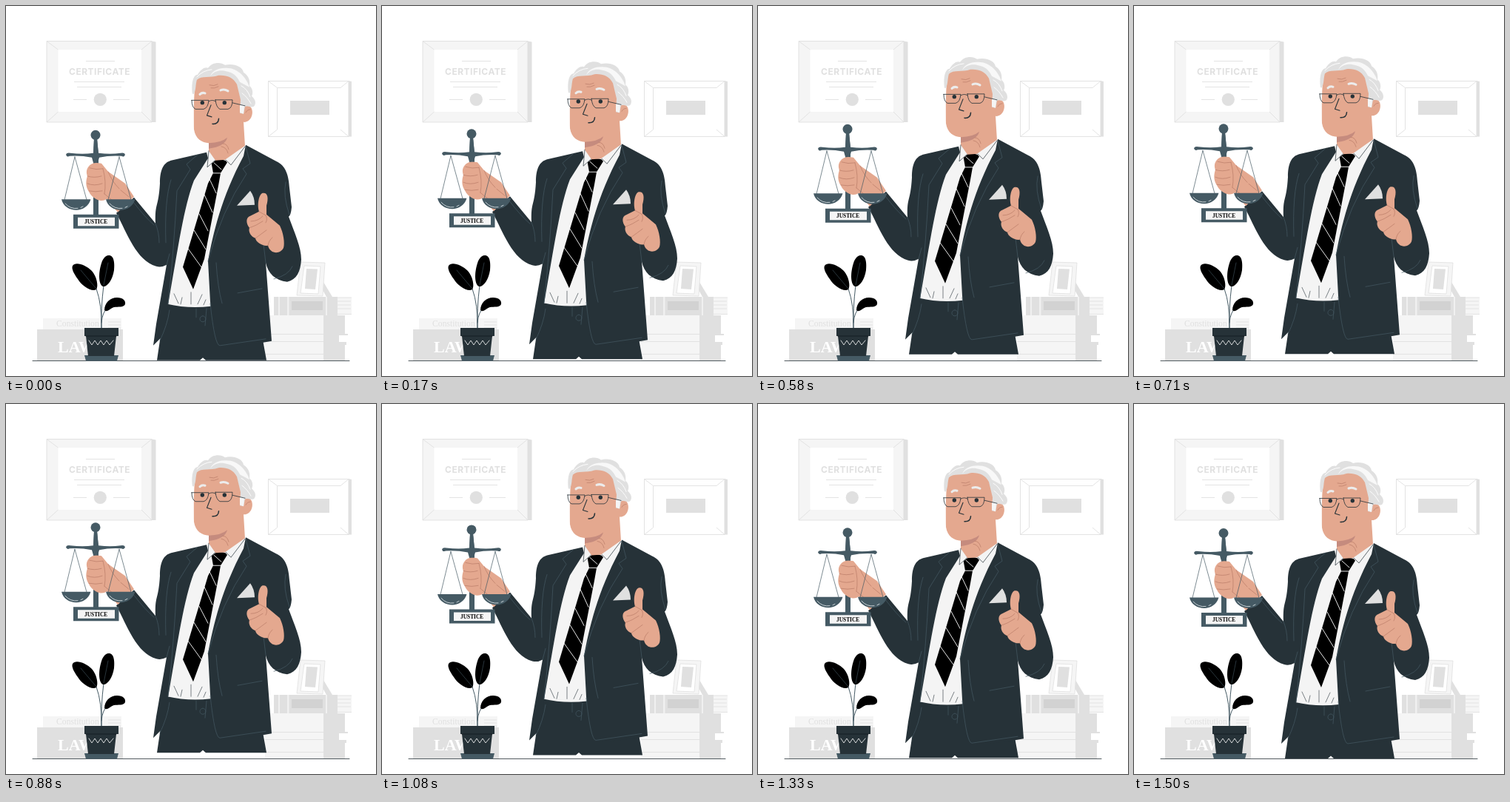
Animation of 500 by 500 pixels, one loop 1540 ms. Source, as an HTML page:

```html
<!DOCTYPE html>
<html lang="en">
<head>
<meta charset="utf-8">
<title>Justice</title>
<style>
html, body { margin: 0; width: 100%; height: 100%; overflow: hidden; background: #fff; }
svg { display: block; width: 100%; height: 100%; }
.line { fill: none; stroke-linecap: round; stroke-linejoin: round; }
.pale { fill: #f5f5f5; }
.grey { fill: #e0e0e0; }
.edge { fill: none; stroke: #e0e0e0; stroke-width: .9; }
.suit { fill: #263238; }
.seam { stroke: #455a64; stroke-width: .7; }
.skin { fill: #e4a88f; }
.crease { stroke: #b97c67; stroke-width: .7; }
.steel { fill: #455a64; }
.ink { stroke: #263238; }
.serif { font-family: "Liberation Serif", "Times New Roman", serif; }
</style>
</head>
<body>
<svg viewBox="0 0 500 500">
  <!-- certificate -->
  <path class="grey" d="M197 47.5 202.5 48.5V157H197Z"/>
  <rect class="pale" x="55" y="47.5" width="142" height="109.5"/>
  <path fill="#fff" d="M70.500 59H183V143H70.500Z"/>
  <path class="edge" d="M55 47.500H197V157H55ZM55 47.500 70.500 59M197 47.500 183 59M55 157 70.500 143M197 157 183 143"/>
  <text x="85" y="93" class="grey" font-family="Inter, sans-serif" font-weight="700" font-size="12" letter-spacing=".5">CERTIFICATE</text>
  <path class="edge" d="M108 74.500H147M92 102.500H160M96 109.500H156M91 126.500H109M145 126.500H167"/>
  <circle class="grey" cx="127.300" cy="126.300" r="8.600"/>

  <!-- small frame -->
  <path class="grey" d="M463 101 467 102V176.500H463Z"/>
  <path fill="#fff" d="M354.500 101.500H463V176.500H354.500Z"/>
  <path class="edge" d="M354.500 101.500H463V176.500H354.500ZM366.500 167V110.500H452M354.500 101.500 366.500 110.500M463 101.500 452 110.500M354.500 176.500 366.500 167M463 176.500 452 167"/>
  <path class="grey" d="M384 128H437V147H384Z"/>

  <!-- books, left -->
  <path class="pale" d="M50 422H156V438H50Z"/>
  <path class="edge" stroke-width=".6" d="M138 427H155M138 431H155M138 435H155"/>
  <text x="68" y="433.300" class="grey serif" font-size="11.700">Constitution</text>
  <path class="grey" d="M42 437H158V479H42Z"/>
  <text x="70" y="468" class="serif" fill="#fff" font-weight="700" font-size="22">LAW</text>

  <!-- books and photo frame, right -->
  <path class="grey" d="M429 373 441 393H433L427 382Z"/>
  <path class="pale" stroke="#e0e0e0" stroke-width=".8" d="M398 346 431 347 428 392 393 391Z"/>
  <path fill="#fff" stroke="#e0e0e0" stroke-width=".8" d="M403 351 425 352 422 389 398 388Z"/>
  <path class="grey" d="M406 355 421 355.500 418 383 404 382Z"/>
  <path class="pale" d="M350 418H429V479H350Z"/>
  <path class="grey" d="M429 418H458V443H462V445H450V454H460V458H458V479H429Z"/>
  <path class="edge" d="M350 443.500H429M350 453.500H429M350 470.500H429"/>
  <path class="grey" d="M362 393H448V418H362Z"/>
  <path class="pale" d="M448 394H467V417H448Z"/>
  <path class="edge" d="M448 394H467M448 399H466M448 404H466M448 409H466M448 416.500H467"/>
  <path fill="#f0f0f0" d="M368 393H370V418H368ZM380 393H382.500V418H380ZM432 393H434V418H432Z"/>
  <path fill="#d2d2d2" d="M386 399H428V411H386Z"/>

  <path class="line ink" stroke-width=".8" d="M36 479.500H464"/>

  <g id="man">
    <!-- shirt and trousers -->
    <path class="suit" d="M217 403 278 405 345 440 352 479H270L266 475.500 262 479H204L208 452Z"/>
    <path fill="#f4f4f4" d="M273 195 321 189 326 200 290 290 274 345 277 406Q246 409.500 218 403L222 330 242 250Z"/>
    <path class="line ink" stroke-width=".6" d="M227 389 233 402M238 394 236 403M250 387V403M265 390 259 403M270 397 267 404"/>
    <path class="line seam" d="M257 409V421M271 409 269 432M266 419a4 4 0 1 1-.1 0M221 411Q218 432 208 452"/>

    <!-- tie -->
    <path d="M277 209Q288 206 300 210L290 226 287 243 268 342 253 383 239 353 273 240 280 226Z"/>
    <path class="line" stroke="#fff" stroke-width=".9" d="M280 226 290 226M275 234 284 253M268 255 279 279M261 281 273 304M254 303 270 329M246 328 264 353M281 212 291 221"/>

    <!-- face and neck -->
    <path class="skin" d="M258 94C253 113 254 145 254 167 256 180 265 185 274 185.500L274 198 283 209 297 208 323 190 321 157C330 158 335 147 332 139 330 134 325 134 322 137L321 105 295 89Z"/>
    <path fill="#c58b7e" d="M274 185.500Q291 185 299 178 296 190 274 193Z"/>
    <path class="line crease" d="M291 190Q298 191 300 199M293 186Q299 186 301 194M324 144Q326 140 330 140M275 107Q281 109 286 106M277 111Q281 112 287 109"/>
    <path fill="#f4f4f4" d="M274 196 272 218 283 209ZM323 189 325 196 303 217 296 208Z"/>
    <path class="line ink" stroke-width=".7" d="M274 196 272 218 282 209M323 190 304 215 297 208"/>

    <!-- hair -->
    <path class="grey" d="M252 119C250 105 253 93 259 93 263 85 270 82 273 84 279 75 291 76 296 80 307 77 320 82 321 90 329 95 330 103 329 108 334 112 334 119 332 122 338 127 338 133 335 136 330 138 326 134 323 136L321 146 316 145 317 127 312 106C307 96 297 93 287 94 276 98 264 94 258 100 256 106 257 113 254 119Z"/>
    <path fill="#f8f8f8" d="M276 95C282 87 291 86 300 89 309 91 313 97 316 103L329 110C325 97 313 83 296 84 286 84 279 88 276 95Z"/>
    <path class="line" stroke="#fff" stroke-width=".9" d="M258 96Q266 87 278 86M318 108Q326 112 330 123M319 118Q326 123 331 132"/>
    <path class="pale" d="M316 134H322L321 146 316 144Z"/>

    <!-- features -->
    <path class="line" stroke="#ececec" stroke-width="3" d="M262 119.500Q265 116.500 269 118M290 114Q295 112 300 115"/>
    <circle class="suit" cx="265.300" cy="130.800" r="2.700"/>
    <circle class="suit" cx="295.300" cy="130.800" r="2.700"/>
    <path class="line ink" stroke-width=".8" d="M251 127.500H274Q273 138 267 139.500H256Q251 137 251 127.500ZM283 127H306Q306 138 300 139.500H289Q284 137 283 127ZM274 129Q279 126 283 129M306 131 323 135"/>
    <path class="line ink" stroke-width="1.100" d="M277 134 271.500 148 278 150"/>
    <path class="line ink" stroke-width="1.500" d="M279 159.500Q287 160 287.500 152.500"/>

    <!-- jacket -->
    <path class="suit" d="M271 198 273 206 254 236C240 273 233 325 219 404L215 430 209 449 199 459 203 430 217 350Q210 354 203 352C176 344 164 308 149 280L173 259 202 294C201 265 206 274 208 240 208 221 213 212 223 209Z"/>
    <path class="suit" d="M324 188 365 210C379 216 382 231 383 246L386 272Q385 283 382 285C390 307 399 326 399 343 398 359 393 370 380 373 364 371 354 362 351 347L359 453Q323 460 288 461 281 458 280 440L276 400 273 345C280 307 291 259 321 203Z"/>
    <path class="line seam" d="M259 201 244 214 249 221 231 250Q227 330 219 403M223 235Q214 262 216 320M202 294Q207 306 207 320M217 350 221 335M324 190 330 213 320 220 325 227Q291 277 273 345M284 347Q286 380 292 402M313 388 346 382M348 322 351 347M276 402Q282 459 289 459L351 450M378 238Q374 257 383 282M362 369Q382 364 387 352M172 265Q188 286 200 296"/>
    <path class="grey" d="M312 270 330 250Q336 258 336 269Z"/>

    <!-- raised thumb -->
    <path class="skin" d="M342 278C339 268 342 254 347 253 354 252 355 260 352 270V282L370 297C375 307 377 321 375 327 371 336 357 336 354 324 347 325 338 320 337 314 331 312 327 305 329 300 324 294 324 286 330 284Z"/>
    <path class="line crease" d="M342 278 351 283M329 300Q338 297 347 291M337 314Q344 309 352 303M354 324Q355 317 360 313M331 291Q341 291 347 284M351 283Q354 288 351 293"/>

    <!-- hand behind scales -->
    <path class="steel" d="M119 179H123L125 202V283H118V202Z"/>
    <path class="skin" d="M111 218Q116 210 129 213L138 224 161 240 173 258 151 279 136 261C128 267 116 260 112 251 107 244 108 236 110 230 108 225 109 221 111 218Z"/>
    <path class="line crease" d="M110 230Q119 233 129 230M110 240Q119 244 130 240M112 250Q121 252 130 250M113 219Q122 222 131 220M131 220Q136 238 133 254M138 224Q143 237 153 247M133 254 144 263M155 249 166 258"/>

    <!-- scales -->
    <circle class="steel" cx="121" cy="174.500" r="6.500"/>
    <path class="steel" d="M81 201Q82 198 87 199 104 201 118 199L119 180H123L125 199Q141 201 155 199 160 198 161 201 160 205 156 203 140 202 126 205L124 212H118L116 205Q101 202 86 203 82 205 81 201Z"/>
    <path class="line" stroke="#455a64" stroke-width=".7" d="M93 204 79 262M93 204 109 262M153 204 138 262M153 204 169 262"/>
    <g id="pan">
      <path class="steel" d="M75 261.500H114.500C112 271 103 276 95 276 86 276 77 271 75 261.500Z"/>
      <path class="line" stroke="#e8eef0" stroke-width=".8" d="M80 267Q87 275 97 273.500M101 272.500 104 271"/>
    </g>
    <use href="#pan" x="60"/>
    <path class="steel" d="M91 282H152.500V301H91Z"/>
    <path class="pale" d="M97 286H147V297.500H97Z"/>
    <text x="121.600" y="294.300" class="serif" text-anchor="middle" font-weight="700" font-size="7.400">JUSTICE</text>
  </g>

  <!-- plant -->
  <path class="line" stroke="#455a64" stroke-width="1" d="M129 436Q130 404 122 382M129 436Q128 410 132 377M129 428Q130 414 137 408"/>
  <path d="M90 351C94 345 108 350 116 358 123 366 125 379 122 383 116 387 102 378 97 369 92 362 88 355 90 351Z"/>
  <path d="M138 337C146 336 147 347 146 357 144 370 137 380 131 379 125 376 125 362 128 351 130 343 133 338 138 337Z"/>
  <path d="M133 411C133 401 141 394 150 394 158 394 162 398 161 403 159 408 151 406 146 407 141 408 137 415 133 411Z"/>
  <path class="line" stroke="#455a64" stroke-width=".6" d="M101 357 122 382M138 347 132 377"/>
  <path class="steel" d="M106 472H152L150 479.500H108Z"/>
  <path class="suit" d="M106 435H152V446H149L146 473H111L108 446H106Z"/>
  <path class="line" stroke="#11191d" stroke-width=".8" d="M108 446H149"/>
  <path class="line" stroke="#fff" stroke-width=".8" d="M112 452 116 458 120 452 124 458 128 452 132 458 136 452 140 458 145 452"/>
</svg>
<script>
const LOOP = 1540, STEPS = 37, PEAK = 710, LIFT = 8.7;
const man = document.getElementById('man');
const tick = LOOP / STEPS;

// The figure breathes up and down on a stepped cosine.
function draw(ms) {
  const t = Math.floor(((ms + 6) % LOOP) / tick) * tick;
  const y = -LIFT * (1 + Math.cos(2 * Math.PI * (t - PEAK) / LOOP)) / 2;
  man.setAttribute('transform', `translate(0 ${y.toFixed(2)})`);
}

let start;
function loop(now) {
  start ??= now;
  draw(now - start);
  requestAnimationFrame(loop);
}
draw(0);
requestAnimationFrame(loop);
</script>
</body>
</html>
```
